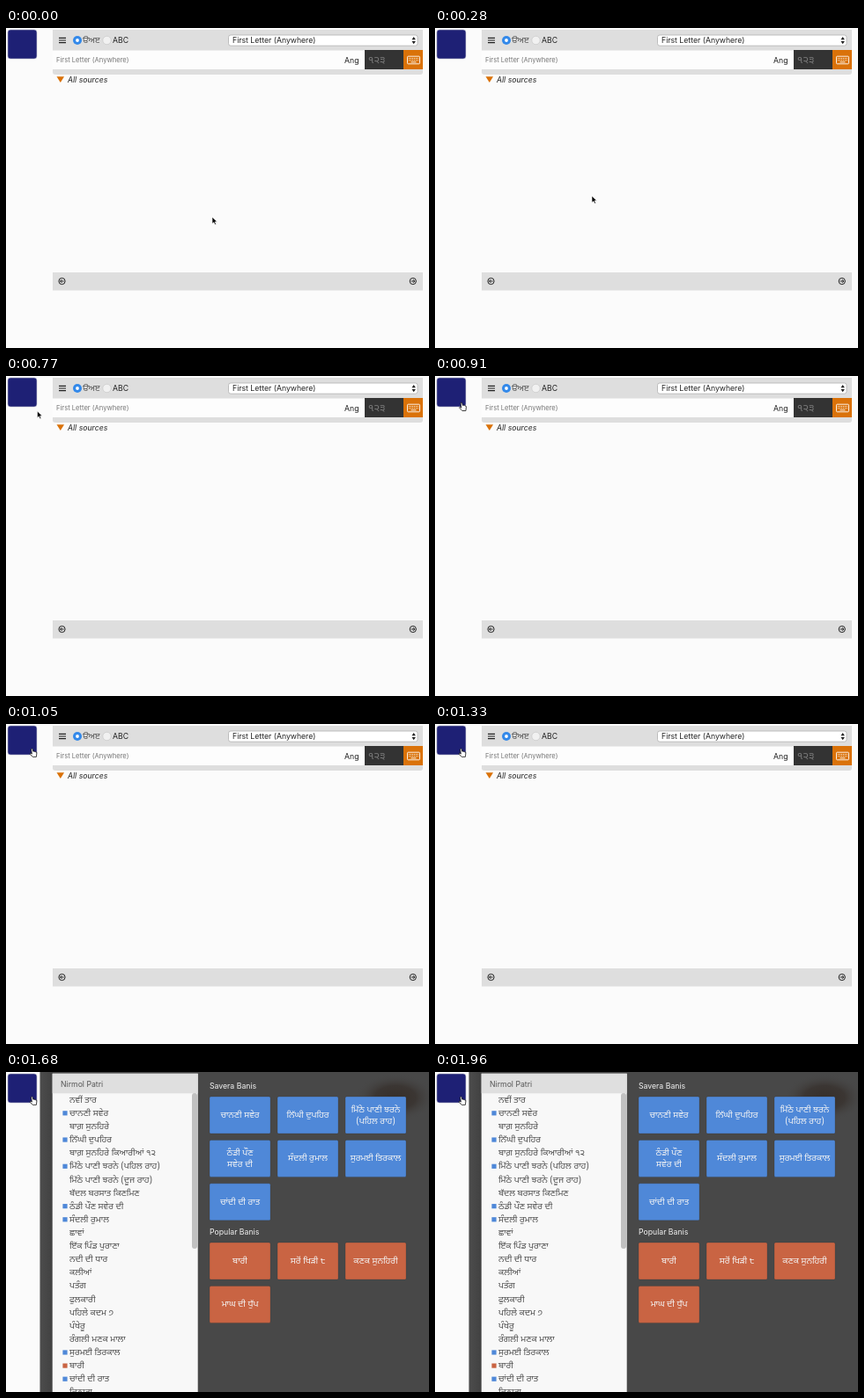
Animation of 480x364 px, one loop 2.03 s. Source, as an HTML page:

```html
<!DOCTYPE html>
<html lang="en">
<head>
<meta charset="utf-8">
<title>Song book menu</title>
<style>
html, body { margin: 0; width: 100%; height: 100%; overflow: hidden; background: #fbfbfb; }
svg { display: block; width: 100vw; height: 100vh; }
text { font: 8.7px Inter, Roboto, sans-serif; fill: #222; }
.pa { font: 10px "Noto Sans Gurmukhi", "Noto Sans", sans-serif; }
.mid { text-anchor: middle; }
#menu .light { fill: #f4f4f4; }
#list text { fill: #505050; }
#tiles rect { stroke: #333; stroke-opacity: .35; stroke-width: .8; }
</style>
</head>
<body>
<svg viewBox="0 0 480 364">
  <defs>
    <radialGradient id="smudge">
      <stop offset="0" stop-color="#362f2a"/>
      <stop offset=".5" stop-color="#3b3633"/>
      <stop offset="1" stop-color="#484848" stop-opacity="0"/>
    </radialGradient>
    <linearGradient id="edge">
      <stop offset="0" stop-color="#4c4c4c"/>
      <stop offset="1" stop-color="#414141"/>
    </linearGradient>
  </defs>
  <rect width="480" height="364" fill="#fbfbfb"/>

  <g id="search">
    <rect x="53" y="44" width="420" height="9" rx="3" fill="#dedede"/>
    <rect x="53" y="25" width="420" height="22" fill="#fdfdfd"/>
    <rect x="53" y="2" width="420" height="23.5" fill="#dedede"/>
    <path d="M60 11.3h8M60 14h8M60 16.7h8" stroke="#222" stroke-width="1.2"/>
    <circle cx="81" cy="14" r="5" fill="#3389ea"/>
    <circle cx="81" cy="14" r="1.9" fill="#fff"/>
    <text class="pa" x="87" y="17.3" style="fill:#555">ੳਅੲ</text>
    <circle cx="114.5" cy="14" r="4.7" fill="#f1f1f1" stroke="#c9c9c9" stroke-width=".7"/>
    <text x="121" y="17.2">ABC</text>
    <rect x="252.5" y="8" width="214.5" height="12.2" rx="2.5" fill="#fff" stroke="#b0b0b0" stroke-width=".8"/>
    <text x="257" y="17.2">First Letter (Anywhere)</text>
    <path d="M460.5 13.2l2.2-3.2 2.2 3.2zM460.5 15l2.2 3.2 2.2-3.2z" fill="#222"/>
    <text x="57" y="39" style="font-size:7.6px;fill:#777">First Letter (Anywhere)</text>
    <text x="384" y="39.6">Ang</text>
    <rect x="407" y="25" width="44" height="22" fill="#333"/>
    <text class="pa" x="411" y="39.6" style="font-size:11.8px;fill:#7c7c7c">੧੨੩</text>
    <rect x="451" y="25" width="22" height="22" fill="#da7209"/>
    <g fill="none" stroke="#fff" stroke-width=".9">
      <rect x="455.5" y="32.2" width="14" height="8.6" rx="1"/>
      <path d="M457.2 34.5h11M457.2 36.6h11" stroke-dasharray="1 .9"/>
      <path d="M459.5 38.8h6"/>
    </g>
    <path d="M57.5 55.3h8.5l-4.2 6.6z" fill="#da7209"/>
    <text x="70" y="61.6" style="font-style:italic">All sources</text>
    <rect x="53" y="278" width="420" height="20.5" fill="#dedede"/>
    <g fill="none" stroke="#222">
      <circle cx="63.5" cy="288" r="3.6"/>
      <circle cx="461.8" cy="288" r="3.6"/>
      <path d="M65.6 288h-4M63.3 286.2l-1.8 1.8 1.8 1.8M459.7 288h4M462 286.2l1.8 1.8-1.8 1.8"/>
    </g>
  </g>

  <g id="menu">
    <rect x="38.7" width="441.3" height="364" fill="#484848"/>
    <rect x="38.7" width="14.3" height="364" fill="url(#edge)"/>
    <ellipse cx="442" cy="29" rx="46" ry="27" fill="url(#smudge)"/>
    <rect x="52.7" y="1.8" width="165" height="363" fill="#f8f8f8"/>
    <rect x="52.7" y="1.8" width="165" height="22.5" fill="#dfdfdf"/>
    <text x="62" y="16.5" style="fill:#555">Nirmol Patri</text>
    <rect x="211" y="24" width="6" height="177" rx="3" fill="#c1c1c1"/>
    <g id="list"></g>
    <text class="light" x="231" y="19.3">Savera Banis</text>
    <text class="light" x="231" y="184.8">Popular Banis</text>
    <g id="tiles"></g>
  </g>

  <rect x="2" y="2" width="33" height="33" rx="3" fill="#1e2075" stroke="#b9b9cc" stroke-width=".6"/>

  <g id="pointer">
    <path id="arrow" d="M0 0V7.6L1.8 6 3.1 8.8 4.4 8.2 3.2 5.5H5.6Z" fill="#000" stroke="#fff" stroke-width=".6"/>
    <path id="hand" d="M-1 .6Q-.2-.6.7.6L1.4 3.3Q2.2 2.6 2.8 3.4 3.7 2.9 4.2 3.8 5.4 3.6 5.4 5L4.9 9.4H.8L-2.2 6.2Q-2.5 4.9-1.2 5.3L-.1 6.1Z" fill="#fff" stroke="#111" stroke-width=".8"/>
  </g>
</svg>
<script>
const LOOP = 2030, STEP = 70, OPEN = 1400, HOVER = 840;
const BLUE = '#4f88d8', RUST = '#c96443';
const $ = id => document.getElementById(id);

const rows = [
  'ਨਵੀਂ ਤਾਰ', 'ਚਾਨਣੀ ਸਵੇਰ', 'ਬਾਗ਼ ਸੁਨਹਿਰੇ', 'ਨਿੱਘੀ ਦੁਪਹਿਰ', 'ਬਾਗ਼ ਸੁਨਹਿਰੇ ਕਿਆਰੀਆਂ ੧੨',
  'ਮਿੱਠੇ ਪਾਣੀ ਝਰਨੇ (ਪਹਿਲ ਰਾਹ)', 'ਮਿੱਠੇ ਪਾਣੀ ਝਰਨੇ (ਦੂਜ ਰਾਹ)', 'ਬੱਦਲ ਬਰਸਾਤ ਕਿਣਮਿਣ',
  'ਠੰਡੀ ਪੌਣ ਸਵੇਰ ਦੀ', 'ਸੰਦਲੀ ਰੁਮਾਲ', 'ਛਾਵਾਂ', 'ਇੱਕ ਪਿੰਡ ਪੁਰਾਣਾ', 'ਨਦੀ ਦੀ ਧਾਰ', 'ਕਲੀਆਂ',
  'ਪਤੰਗ', 'ਫੁਲਕਾਰੀ', 'ਪਹਿਲੇ ਕਦਮ ੭', 'ਪੰਖੇਰੂ', 'ਰੰਗਲੀ ਮਣਕ ਮਾਲਾ', 'ਸੁਰਮਈ ਤਿਰਕਾਲ', 'ਬਾਰੀ',
  'ਚਾਂਦੀ ਦੀ ਰਾਤ', 'ਕਿਨਾਰਾ'
];
const marks = { 1: BLUE, 3: BLUE, 5: BLUE, 8: BLUE, 9: BLUE, 19: BLUE, 20: RUST, 21: BLUE };

$('list').innerHTML = rows.map((name, i) => {
  const y = 31.4 + i * 15.12;
  const mark = marks[i] ? `<rect x="64.4" y="${y - 2.3}" width="5.2" height="5.2" fill="${marks[i]}"/>` : '';
  return `${mark}<text class="pa" x="72" y="${y + 3.4}">${name}</text>`;
}).join('');

// A slash splits a label into two lines.
const tileGroup = (names, top, color) => names.map((name, i) => {
  const x = 231 + i % 3 * 77, y = top + Math.floor(i / 3) * 49.4;
  const lines = name.split('/');
  const labels = lines.map((line, k) =>
    `<text class="pa mid light" x="${x + 34.5}" y="${y + 24 + (k - (lines.length - 1) / 2) * 13}">${line}</text>`);
  return `<rect x="${x}" y="${y}" width="69" height="42" rx="1.5" fill="${color}"/>${labels.join('')}`;
}).join('');

$('tiles').innerHTML =
  tileGroup([rows[1], rows[3], 'ਮਿੱਠੇ ਪਾਣੀ ਝਰਨੇ/(ਪਹਿਲ ਰਾਹ)', 'ਠੰਡੀ ਪੌਣ/ਸਵੇਰ ਦੀ', rows[9], rows[19], rows[21]], 28, BLUE) +
  tileGroup([rows[20], 'ਸਰੋਂ ਖਿੜੀ ੮', 'ਕਣਕ ਸੁਨਹਿਰੀ', 'ਮਾਘ ਦੀ ਧੁੱਪ'], 194, RUST);

// Pointer path: time, x, y and velocity in px/ms.
const path = [
  [0, 234, 215, -.1, -.03],
  [280, 178, 191, -.33, -.25],
  [770, 35.5, 40, -.07, -.11],
  [1050, 29.5, 28, 0, 0]
];

function pointerAt(t) {
  const end = path.findIndex(key => key[0] > t);
  if (end < 0) return path[path.length - 1].slice(1, 3);
  const a = path[end - 1], b = path[end], d = b[0] - a[0], u = (t - a[0]) / d;
  const s = u * u * (3 - 2 * u), out = u * (1 - u) ** 2 * d, into = u * u * (u - 1) * d;
  return [1, 2].map(i => a[i] + (b[i] - a[i]) * s + a[i + 2] * out + b[i + 2] * into);
}

const show = (id, on) => { $(id).style.display = on ? '' : 'none'; };
const start = performance.now();

function draw() {
  const t = Math.floor((performance.now() - start) % LOOP / STEP) * STEP;
  show('search', t < OPEN);
  show('menu', t >= OPEN);
  show('arrow', t < HOVER);
  show('hand', t >= HOVER);
  $('pointer').setAttribute('transform', `translate(${pointerAt(t)})`);
  requestAnimationFrame(draw);
}
draw();
</script>
</body>
</html>
```
